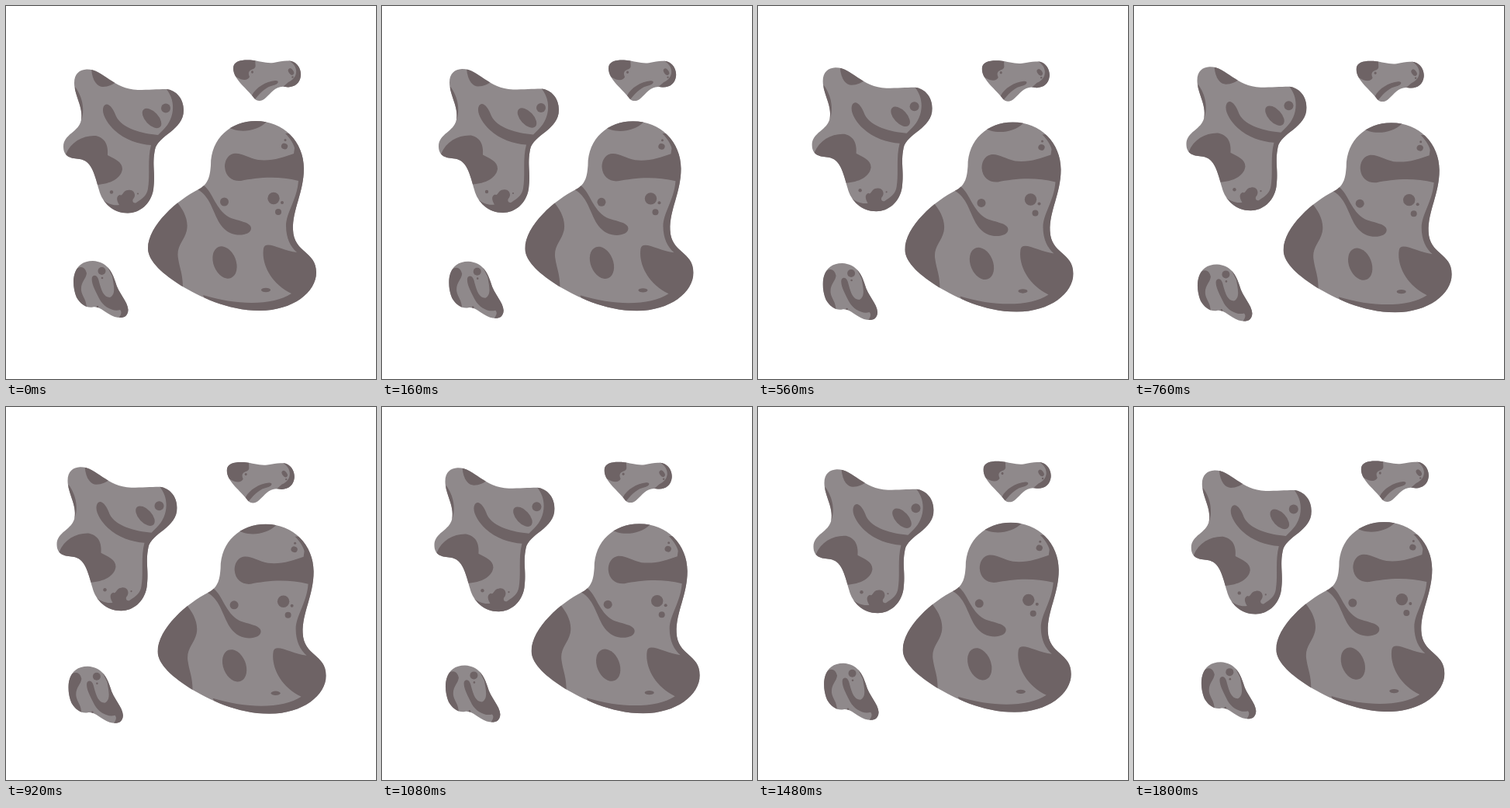
These frames come from a looping animation (477 by 480 pixels, 1840 ms). An HTML page:

```html
<!DOCTYPE html>
<html lang="en">
<head>
<meta charset="utf-8">
<title>Drifting rocks</title>
<style>
  html, body { margin: 0; width: 100%; height: 100%; overflow: hidden; background: #fff; }
  svg { display: block; width: 100vw; height: 100vh; }
</style>
</head>
<body>
<svg id="stage" viewBox="0 0 477 480"></svg>
<script>
const LIGHT = '#8f898b', DARK = '#6e6365';
const LOOP = 1840, STEP = 40;

// drift: offset at the far end of the swing
// dots: [cx, cy, rx, ry, angle]
const rocks = [
  {
    drift: [12.6, 2.8],
    outline: 'M322 148C358 148 384 175 384 209C384 240 369 262 370 288C371 318 400 315 400 343C400 368 370 392 327 392C285 392 248 373 226 360C204 346 183 329 183 312C183 282 222 249 248 236C262 229 263 217 264 205C264 170 290 148 322 148Z',
    patches: [
      'M284 154C296 164 322 163 336 149L330 140H285Z',
      'M360 164C367 171 371 178 372 183L371 190C357 195 342 200 325 198C311 195 303 188 293 190C285 192 282 200 282 207C283 220 292 226 303 225C322 221 350 218 377 225C375 250 361 266 361 283C361 299 367 310 375 317C356 315 334 300 332 312C329 331 341 357 368 370C345 385 300 386 254 372L270 410H420V160Z',
      'M220 252C228 261 236 275 233 289C230 302 219 309 222 325C224 338 228 345 228 362L170 350V250Z',
      'M255 231C267 240 270 262 288 272C300 277 316 278 316 286C316 293 305 296 295 294C274 289 271 268 262 252C257 243 252 239 247 236Z'
    ],
    dots: [[281.5, 252, 5.5, 5.5], [345, 247.5, 7.7, 7.7], [356, 253, 2, 2], [351, 265, 4, 4],
      [359, 180.5, 4.2, 3.8, 20], [360, 172.5, 1.5, 1.5], [282, 330, 14.5, 21.5, -22], [335, 365.5, 6, 2.7]]
  },
  {
    drift: [-8.5, -4.3],
    outline: 'M104 81.5C125 81 138 107 170 108C184 108 195 107 206 107C220 108 229 120 229 134C229 160 196 166 192 185C188 205 193 215 190 236C187 255 172 266.5 157 266.5C138 266.5 124 253 120 237C114 215 110 199 95 197C85 196 74 195 74 181C74 165 94 162 97 147C100 130 88 115 88 99C88 87 95 82 104 81.5Z',
    patches: [
      'M110 80C111 97 118 104 125 104C132 104 138 101 143 97L125 75Z',
      'M89 104C99 117 103 137 95 152L85 150Z',
      'M126 129C130 122 138 130 142 142C150 158 175 164 196 166L203 159C217 146 220 122 206 106L240 100V180L194 240C190 255 172 270 157 270C140 268 130 260 124 249C132 255 138 257 146 256C143 251 141 245 147 243C150 246 151 237 157 237C164 235 168 242 165 247C161 251 165 255 168 253C176 248 182 243 183 235C186 216 182 198 187 179C171 178 153 172 140 160C130 151 122 137 126 129Z',
      'M77 191C84 174 100 166 116 167C129 170 132 181 131 192C140 197 150 200 150 210C148 224 130 230 115 230L90 210Z'
    ],
    dots: [[206, 131.5, 6, 6], [188, 144.5, 8.5, 15.5, -43], [136, 239.5, 2.2, 2.2], [170, 241.5, 1.1, 1.1]]
  },
  {
    drift: [-8.3, 1.6],
    outline: 'M293 80C293 70 305 69 315 69.5C328 71 335 74 345 73C355 71 360 70 368 71C376 73 381 82 380 90C379 100 370 106 360 104C348 102 342 112 335 118C330 123 324 123 320 119C312 107 293 95 293 80Z',
    patches: [
      'M322 68C320 75 324 78 319 81C312 83 312 87 314 91C313 95 306 97 298 92L285 85V60Z',
      'M364 70C377 76 378 92 364 98L356 105L370 112L390 95L375 65Z',
      'M317 115C322 105 335 97 347 96C354 96 350 101 345 102C336 104 330 109 321 120Z'
    ],
    dots: [[317.5, 85, 1.5, 1.7], [367.5, 84.5, 3, 4.7, -35], [369.5, 91.5, 1.2, 1.2]]
  },
  {
    drift: [-6.6, 5.7],
    outline: 'M112 328C130 329 137 342 141 355C145 370 157 380 157.5 391C157 402 148 402 140 400C128 396 122 386 112 387.5C104 389 96 384 91 375C83 355 86 328 112 328Z',
    patches: [
      'M88 341C95 333 102 335 104 344C103 352 96 355 97 366C98 374 104 377 104 390L80 385Z',
      'M111 349C114 344 119 348 120 355C123 366 126 375 134 375C142 371 139 360 137 348L130 334L145 350L162 385L158 402H145C148 398 150 394 147 391C138 394 126 387 121 378C116 368 109 356 111 349Z'
    ],
    dots: [[123.5, 341, 5, 5], [124, 350, 1.3, 1.3], [118, 387, 1.3, 1.3]]
  }
];

const path = (d, fill) => `<path d="${d}" fill="${fill}"/>`;
const dot = ([cx, cy, rx, ry, angle = 0]) =>
  `<ellipse cx="${cx}" cy="${cy}" rx="${rx}" ry="${ry}" fill="${DARK}" transform="rotate(${angle} ${cx} ${cy})"/>`;

const stage = document.getElementById('stage');
stage.innerHTML = rocks.map(({ outline, patches, dots }, i) => `
  <g class="rock">
    <clipPath id="clip${i}"><path d="${outline}"/></clipPath>
    ${path(outline, LIGHT)}
    <g clip-path="url(#clip${i})">${patches.map(d => path(d, DARK)).join('')}${dots.map(dot).join('')}</g>
  </g>`).join('');
const groups = stage.querySelectorAll('.rock');

const ease = u => 0.6 * u + 0.4 * u * u;
const start = performance.now();

function draw(now) {
  const t = Math.floor((Math.max(0, now - start) % LOOP) / STEP) * STEP;
  const k = ease(1 - Math.abs(1 - t / (LOOP / 2)));
  rocks.forEach(({ drift: [x, y] }, i) =>
    groups[i].setAttribute('transform', `translate(${x * k} ${y * k})`));
  requestAnimationFrame(draw);
}
draw(start);
</script>
</body>
</html>
```
